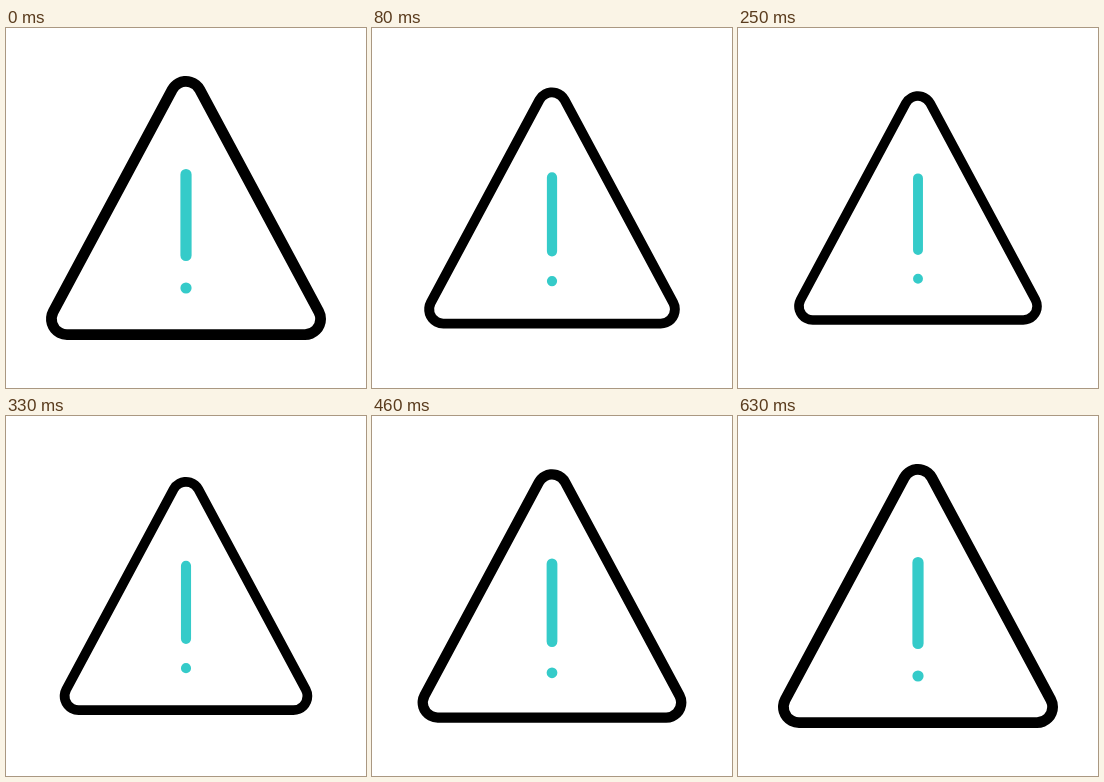
Recreate the animation shown at these times as an HTML page. Size 360x360 px, loop 1.54 s.

```html
<!DOCTYPE html>
<html lang="en">
<head>
<meta charset="utf-8">
<title>Warning pulse</title>
<style>
  html, body { margin: 0; width: 100%; height: 100%; overflow: hidden; background: #fff; }
  svg { display: block; width: 100%; height: 100%; }
  .sign { stroke-linejoin: round; }
  .mark { stroke: #35cbc9; stroke-width: 11.2; stroke-linecap: round; }
</style>
</head>
<body>
<svg viewBox="0 0 360 360">
  <g id="icon">
    <path class="sign" d="M180 69L61 291H299Z" stroke="#000" stroke-width="42"/>
    <path class="sign" d="M180 69L61 291H299Z" fill="#fff" stroke="#fff" stroke-width="20.4"/>
    <path class="mark" d="M180 146.5V227.5M180 260h.01"/>
  </g>
</svg>
<script>
const LOOP = 1540, FPS = 24, LAST = 15;
const icon = document.getElementById('icon');

// [step, scale] of the double pulse
const keys = [[0, 1], [2, .913], [4, .882], [8, .902], [10, .96], [13, .951], [LAST, 1]];

function slope(i) {
  const a = keys[i - 1], b = keys[i + 1];
  return a && b ? (b[1] - a[1]) / (b[0] - a[0]) : 0;
}

// Smooth cubic through the keys
function scaleAt(x) {
  if (x >= LAST) return 1;
  const i = keys.findIndex(k => k[0] > x) - 1;
  const [x0, y0] = keys[i], [x1, y1] = keys[i + 1];
  const d = x1 - x0, u = (x - x0) / d, v = 1 - u;
  return y0 * v * v * (1 + 2 * u) + y1 * u * u * (3 - 2 * u)
    + d * u * v * (slope(i) * v - slope(i + 1) * u);
}

function draw(now) {
  const step = Math.floor((now % LOOP) * FPS / 1000 + .1);
  icon.setAttribute('transform', `translate(180 180) scale(${scaleAt(step)}) translate(-180 -180)`);
  requestAnimationFrame(draw);
}
const start = performance.now();
draw(0);
requestAnimationFrame(function tick() {});
</script>
</body>
</html>
```
